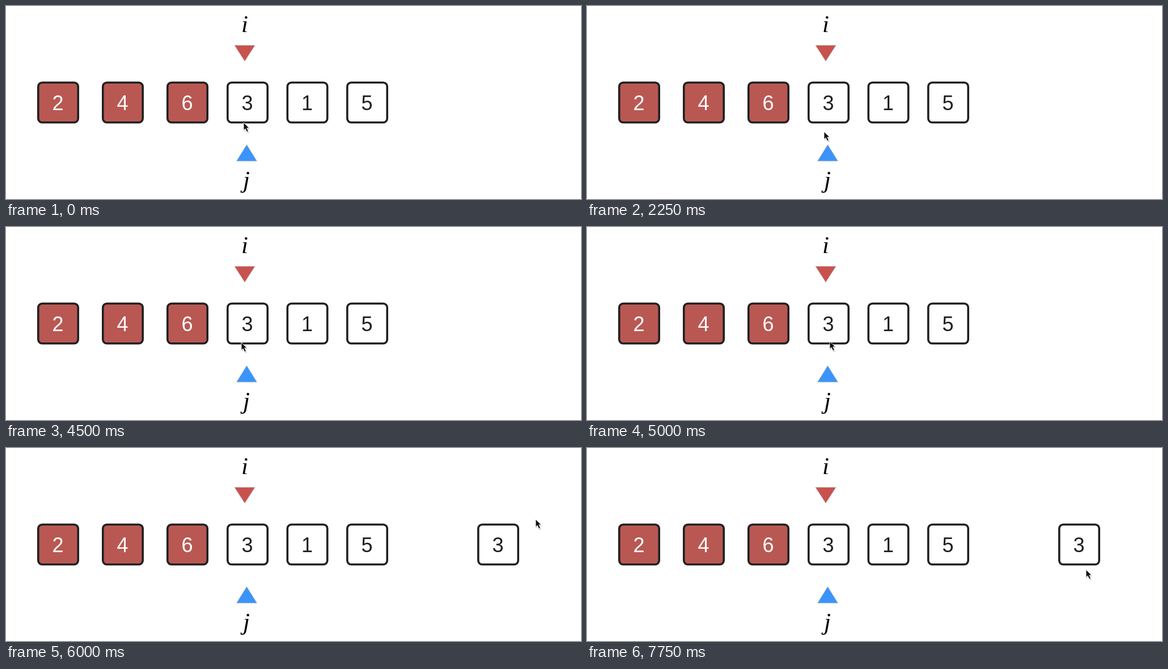
Animation, 1014 px wide and 341 px high, one loop 8000 ms. Source, as an HTML page:

```html
<!DOCTYPE html>
<html lang="en">
<head>
<meta charset="utf-8">
<title>Insertion step</title>
<style>
  html, body { margin: 0; width: 100%; height: 100%; overflow: hidden; background: #fff; }
  svg { display: block; width: 100vw; height: 100vh; }
  .card rect { fill: none; stroke: #202022; stroke-width: 3.6; }
  .card text { font: 36px "Liberation Sans", Arial, sans-serif; text-anchor: middle; fill: #202022; }
  .sorted rect { fill: #b95852; }
  .sorted text { fill: #fff; }
  .index { font: italic 43px "Liberation Serif", Times, serif; text-anchor: middle; }
  .marker { stroke: #bbb; stroke-opacity: .7; stroke-width: 1; }
</style>
</head>
<body>
<svg viewBox="0 0 1014 341">
  <text class="index" x="421" y="46">i</text>
  <path class="marker" fill="#c8524d" d="M403 69.500H439L421 97.500Z"/>
  <path class="marker" fill="#3b94fb" d="M406.500 274H442.500L424.500 245Z"/>
  <text class="index" x="424" y="321">j</text>
  <g id="cards"></g>
  <g id="cursor">
    <path d="M1 2V16L4 13L7 19L10 18L7 12H11Z" fill="#777" opacity=".3"/>
    <path d="M0 0V13.500L3 10.800L5.700 16.500L8.400 15.300L5.800 9.700H10Z"
          fill="#111" stroke="#fff" stroke-width=".8"/>
  </g>
</svg>
<script>
const LOOP = 8000, STEP = 250;
const HOME = 389, ASIDE = 831;
const svgNS = "http://www.w3.org/2000/svg";

// Pointer stops: time, x, y
const path = [
  [500, 419, 206], [1000, 418, 217], [1500, 417, 225], [2250, 418, 222],
  [2750, 420, 209], [3250, 421, 201], [4500, 415, 204], [5000, 428, 202],
  [5250, 545, 199], [5500, 722, 184], [5750, 858, 150], [6000, 934, 126],
  [6250, 914, 146], [6750, 897, 183], [7500, 880, 215]
];

function addCard(x, digit, sorted) {
  const card = document.createElementNS(svgNS, "g");
  card.setAttribute("class", sorted ? "card sorted" : "card");
  card.innerHTML = `<rect x="1.800" y="1.800" width="70.400" height="70.400" rx="7"/>
    <text x="36.500" y="50">${digit}</text>`;
  document.getElementById("cards").append(card);
  place(card, x, 133.5);
  return card;
}

function place(node, x, y) {
  node.setAttribute("transform", `translate(${x} ${y})`);
}

function pointerAt(time) {
  const next = path.findIndex(stop => stop[0] > time);
  if (next === 0) return path[0].slice(1);
  if (next < 0) return path.at(-1).slice(1);
  const [t0, x0, y0] = path[next - 1], [t1, x1, y1] = path[next];
  const k = (time - t0) / (t1 - t0);
  return [x0 + (x1 - x0) * k, y0 + (y1 - y0) * k];
}

function copyAt(time) {
  const k = Math.min(1, Math.max(0, (time - 5000) / 930));
  return HOME + (ASIDE - HOME) * (1 - Math.cos(Math.PI * k)) / 2;
}

[[55, 2, true], [169, 4, true], [283, 6, true], [HOME, 3], [494.5, 1], [600, 5]]
  .forEach(spec => addCard(...spec));
const copy = addCard(HOME, 3);
const cursor = document.getElementById("cursor");
const start = performance.now();

function draw(now) {
  const elapsed = Math.max(0, now - start) % LOOP;
  const time = Math.floor(elapsed / STEP) * STEP;
  copy.style.display = time > 5000 ? "" : "none";
  place(copy, copyAt(time), 133.5);
  place(cursor, ...pointerAt(time));
  requestAnimationFrame(draw);
}
draw(start);
</script>
</body>
</html>
```
